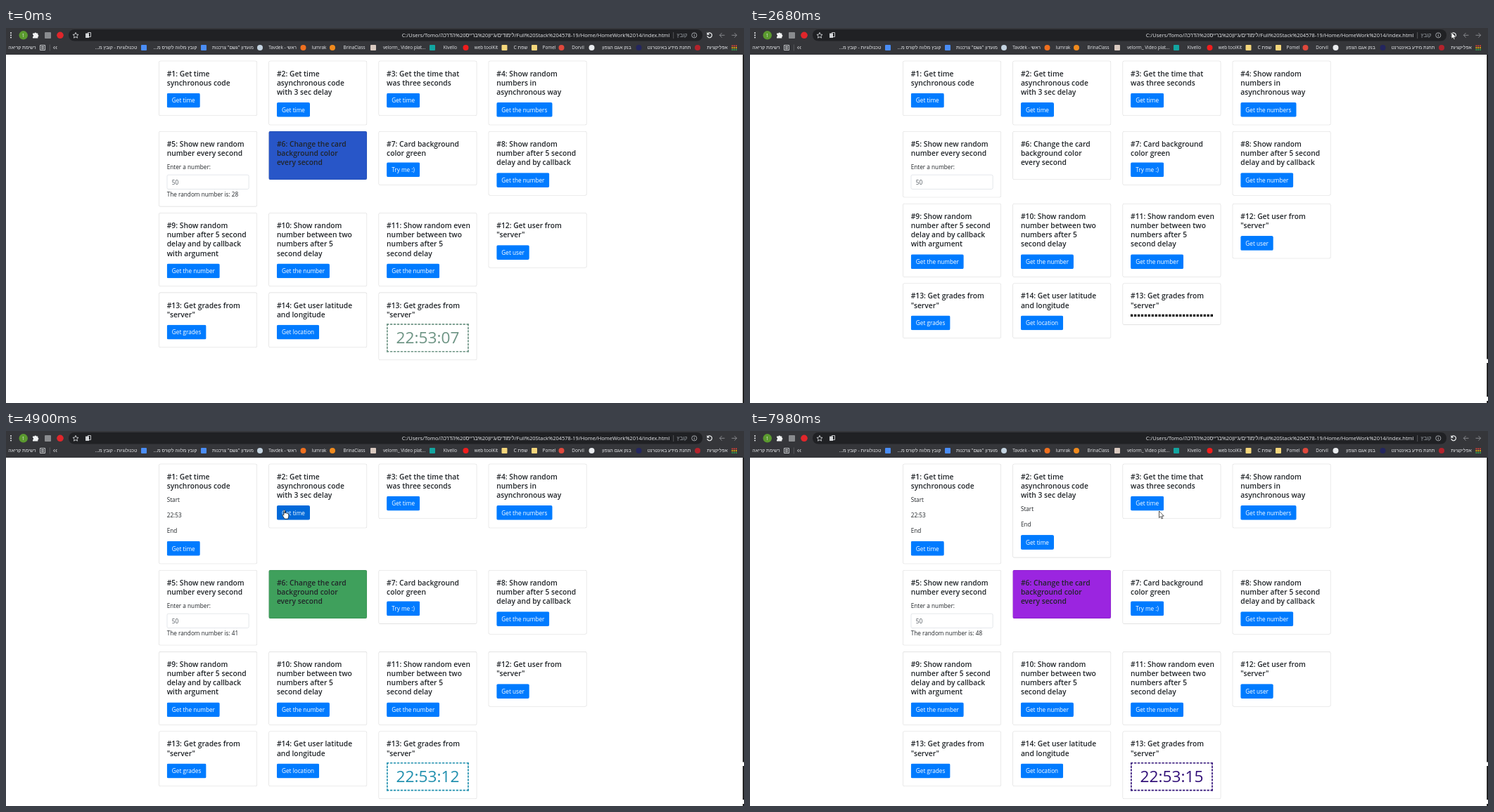
Recreate the animation shown at these times as an HTML page. Size 1049 by 534 pixels, loop 8 s.

```html
<!DOCTYPE html>
<html lang="en">
<head>
<meta charset="utf-8">
<title>Async exercises</title>
<style>
  html, body { margin: 0; width: 100%; height: 100%; overflow: hidden; background: #fff; }
  body { font: 15px/24px "Open Sans", "Noto Sans", "Liberation Sans", sans-serif; color: #212529; }
  svg { position: absolute; left: 0; top: 0; width: 1049px; height: 534px; }
  #chrome text { text-anchor: middle; fill: #e8eaed; font-size: 6.4px; line-height: 1; }
  #chrome text[direction=rtl] { font-size: 6.8px; }
  #page {
    position: absolute; left: 0; top: 0; display: grid;
    grid-template-columns: repeat(4, 255px); gap: 16px 30px; align-items: start;
    transform-origin: 0 0; transform: translate(217.2px, 46.7px) scale(.548);
  }
  .card { box-sizing: border-box; padding: 20px; border: 1px solid rgba(0, 0, 0, .15); border-radius: 4px; background: #fff; white-space: nowrap; }
  h5 { margin: 0 0 12px; font-size: 18.8px; line-height: 24px; font-weight: 600; }
  p { margin: 0 0 16px; }
  .btn { width: fit-content; padding: 6px 12px; border: 1px solid transparent; border-radius: 4px; line-height: 24px; background: #007bff; background-clip: border-box; background-origin: border-box; color: #fff; }
  /* collapses with the heading margin */
  h5 + .btn, [hidden] + .btn { margin-top: 15px; }
  h5 + .btn.tight { margin-top: 0; }
  .btn.hover { background: #0069d9; }
  .btn.down { background: #0062cc; }
  .field { margin-top: 8px; padding: 6px 12px; border: 1px solid #ced4da; border-radius: 4px; color: #495057; }
  #clock { border: 3px dashed; text-align: center; font-size: 41.4px; line-height: 67.5px; }
</style>
</head>
<body>
<div id="page"></div>
<svg id="chrome" viewBox="0 0 1049 534"></svg>
<svg id="pointer" viewBox="0 0 1049 534">
  <g id="cursor">
    <circle id="glow" r="7" fill="#e6d21e" fill-opacity=".75"/>
    <path id="arrow" d="M0 0V9.6L2.2 7.6 3.7 11 5.2 10.3 3.8 7.1H6.8Z" fill="#fff" stroke="#111" stroke-width=".7"/>
    <path id="hand" d="M-.9 1Q0-.6 .9 1V4.6Q2-.1 0 4.8 2.4 4 2.6 5 4.2 4.6 4.4 5.6 6 5.2 6 7V9.4L5 13H.2L-2.6 8.4Q-3.2 6.8-1.9 7L-.9 8Z" fill="#fff" stroke="#111" stroke-width=".7"/>
  </g>
</svg>
<script>
const LOOP = 8000, RELOAD = 2660, OPEN_1 = 3890, OPEN_2 = 5760;
const $ = id => document.getElementById(id);

// ---- page cards ----
const btn = (label, attrs = '') => `<div class="btn" ${attrs}>${label}</div>`;
const log = (id, ...lines) => `<div id="${id}" hidden>${lines.map(l => `<p>${l}</p>`).join('')}</div>`;
const number = btn('Get the number');
const cards = [
  ['#1: Get time|synchronous code', log('log1', 'Start', '22:53', 'End') + btn('Get time', 'id="btn1"')],
  ['#2: Get time|asynchronous code|with 3 sec delay', log('log2', 'Start', 'End') + btn('Get time', 'id="btn2"')],
  ['#3: Get the time that|was three seconds', btn('Get time')],
  ['#4: Show random|numbers in|asynchronous way', btn('Get the numbers')],
  ['#5: Show new random|number every second', '<div>Enter a number:</div><div class="field">50</div><div id="random"></div>'],
  ['#6: Change the card|background color|every second', ''],
  ['#7: Card background|color green', '<div class="btn tight">Try me :)</div>'],
  ['#8: Show random|number after 5 second|delay and by callback', number],
  ['#9: Show random|number after 5 second|delay and by callback|with argument', number],
  ['#10: Show random|number between two|numbers after 5|second delay', number],
  ['#11: Show random even|number between two|numbers after 5|second delay', number],
  ['#12: Get user from|"server"', btn('Get user')],
  ['#13: Get grades from|"server"', btn('Get grades')],
  ['#14: Get user latitude|and longitude', btn('Get location')],
  ['#13: Get grades from|"server"', '<div id="clock"></div>'],
];
$('page').innerHTML = cards.map(([title, body]) =>
  `<div class="card"><h5>${title.replaceAll('|', '<br>')}</h5>${body}</div>`).join('');
const tinted = $('page').children[5];

// ---- browser frame ----
function add(tag, attrs, text) {
  const el = document.createElementNS('http://www.w3.org/2000/svg', tag);
  for (const k in attrs) el.setAttribute(k, attrs[k]);
  if (text) el.textContent = text;
  return $('chrome').appendChild(el);
}
const rect = (x, y, width, height, fill, rx = 0) => add('rect', { x, y, width, height, fill, rx });
const dot = (cx, cy, r, fill) => add('circle', { cx, cy, r, fill });
const line = (d, stroke = '#e8eaed', width = 1) => add('path', { d, stroke, fill: 'none', 'stroke-width': width });
const label = (x, y, text, style = '') =>
  add('text', { x, y, style, direction: /^[^a-z]*[\u05d0-\u05ea]/i.test(text) ? 'rtl' : 'ltr' }, text);

rect(0, 0, 1049, 38, '#35363a');
rect(89, 2, 901, 16.5, '#202124', 8);
for (const y of [7, 10.3, 13.6]) dot(7, y, 1, '#e8eaed');
dot(24.7, 10.3, 6.2, '#5b9a2f');
label(24.7, 12.6, '1');
add('path', { d: 'M38 7.5H40.3A1.6 1.6 0 0 1 43.3 7.5H45.3V9.5A1.6 1.6 0 0 1 45.3 12.5V14.5H38V12.5A1.6 1.6 0 0 0 38 9.5Z', fill: '#f1f3f4' });
rect(55, 6, 9, 9, '#8a8c8f', 1);
dot(77, 10.3, 4.8, '#e0262b');
line('M99 6.4L100.2 9.1 103 9.4 100.9 11.3 101.5 14.2 99 12.7 96.5 14.2 97.1 11.3 95 9.4 97.8 9.1Z', '#e8eaed', .8);
rect(113, 7.5, 5, 6.5, '#cfd1d4', .6);
line('M116.5 6.5H120.5V12.5H116.5Z', '#e8eaed', .8);

label(943.5, 13, "C:/Users/Tomo/לימודים/ג'יון%20ברייס%20הדרכה/Full%20Stack%204578-19/Home/HomeWork%2014/index.html",
  'font-size:7.5px;text-anchor:end');
line('M948.7 6V15', '#6a6c70', .7);
label(961, 13, 'קובץ', 'font-size:7.6px;fill:#9aa0a6');
add('circle', { cx: 978.3, cy: 10.3, r: 3.6, fill: 'none', stroke: '#bdc1c6', 'stroke-width': .8 });
line('M978.3 9.8V12.3M978.3 8.1V9', '#bdc1c6', .9);
line('M997.4 8.1A3.4 3.4 0 1 1 996.7 11.2', '#f1f3f4', 1.2);
add('path', { d: 'M996.4 6V9.7H1000.1Z', fill: '#f1f3f4' });
line('M1021.5 10.3H1014.3M1017.6 7L1014.3 10.3 1017.6 13.6', '#85878b');
line('M1031.5 10.3H1038.7M1035.4 7L1038.7 10.3 1035.4 13.6', '#85878b');

// text centre, text, icon x, icon colour, round icon
const bookmarks = [
  [156.5, 'טכנולוגיות - קובץ מ...', 196, '#4a8df6'],
  [240.5, 'קובץ מלווה לקורס מ...', 281, '#4a8df6'],
  [322.5, 'מועדון "גשם" צרכנות', 361, '#c3d3e0', 1],
  [393, 'Tavdek - ראשי', 422.5, '#f0701f', 1],
  [445, 'lumrak', 464, '#f08a1d', 1],
  [495, 'BrinaClass', 522, '#d9c9c0'],
  [566, 'velorm_ Video plat...', 606, '#12a5a0'],
  [631.5, 'Kivello', 653.5, '#f01d1d', 1],
  [682.5, 'web toolKit', 708.5, '#f5d67b'],
  [731.5, 'שפת C', 751, '#f5d67b'],
  [772, 'Pomel', 789.5, '#e0483c', 1],
  [813, 'Dorvil', 832.5, '#e9ebee', 1],
  [868, 'בנק אגם הצפון', 899.5, '#24265f', 1],
  [942.5, 'תחנת מידע באינטרנט', 983, '#b3232c', 1],
];
for (const [x, text, ix, color, round] of bookmarks) {
  label(x, 30.3, text);
  round ? dot(ix, 28, 4, color) : rect(ix - 4, 24, 8, 8, color, 1);
}
label(23, 30.3, 'רשימת קריאה');
line('M48.5 24.5H55.5V31.5H48.5ZM50 26.5H54M50 28H54M50 29.7H54', '#e8eaed', .8);
line('M62.3 23.5V32.5', '#66686c', .7);
line('M69.3 26L67.6 28 69.3 30M72.3 26L70.6 28 72.3 30', '#e8eaed', .9);
label(1011, 30.3, 'אפליקציות');
const hues = ['#ea4335', '#fbbc05', '#34a853'];
for (let i = 0; i < 9; i++) rect(1031.5 + i % 3 * 2.8, 24.5 + (i / 3 | 0) * 2.8, 1.8, 1.8, hues[(i / 3 | 0)]);

rect(1047.3, 38, 1.7, 496, '#0c0c0c');
const gaps = [rect(1047, 471.5, 2, 5.5, '#fff'), rect(1047, 525, 2, 6, '#fff')];

// ---- timeline ----
// time, random number, seconds, card colour, clock colour
const ticks = [
  [0, 28, '07', '#2856c8', '#6d9484'],
  [750, 35, '08', '#36d8b7', '#5122d8'],
  [1750, 24, '09', '#4fcbff', '#f95f22'],
  [RELOAD, 0, '', '#fff', '#000'],
  [3660, 13, '11', '#96132e', '#d81452'],
  [4660, 41, '12', '#3fa05c', '#1f8fae'],
  [5660, 36, '13', '#68703a', '#bfc8c2'],
  [6660, 19, '14', '#d98f2c', '#7a4a1d'],
  [7660, 48, '15', '#9b25e0', '#310f78'],
];
const path = [
  [70, 976, 476], [310, 997, 78], [480, 1003, 40], [900, 1040, 522], [1270, 1026, 454],
  [1450, 1018, 219], [1900, 1017, 60], [2200, 997, 6], [3040, 997, 6], [3300, 690, 40],
  [3570, 274.5, 105], [3830, 274.5, 105], [3890, 265, 104], [4200, 265, 104],
  [4980, 410.5, 113], [6360, 410.5, 113], [6680, 499, 138], [7010, 499, 138],
  [7140, 553, 140], [7290, 553, 140], [7370, 556, 141], [7600, 556, 141], [7980, 581.5, 114],
];
const within = (t, ...spans) => spans.some(([a, b]) => t >= a && t < b);
const show = (el, on) => { el.style.display = on ? '' : 'none'; };

function cursorAt(t) {
  const i = path.findIndex(p => p[0] > t);
  if (i < 1) return path[i < 0 ? path.length - 1 : 0].slice(1);
  const [a, b] = [path[i - 1], path[i]], k = (t - a[0]) / (b[0] - a[0]);
  return [a[1] + (b[1] - a[1]) * k, a[2] + (b[2] - a[2]) * k];
}

let shown;
function tick(t) {
  const now = ticks.findLast(s => s[0] <= t);
  if (now === shown) return;
  shown = now;
  const [, value, sec, fill, ink] = now;
  $('random').textContent = value ? 'The random number is: ' + value : '';
  $('clock').textContent = sec && '22:53:' + sec;
  $('clock').style.color = ink;
  tinted.style.background = fill;
}

function render(t) {
  tick(t);
  $('log1').hidden = t < OPEN_1;
  $('log2').hidden = t < OPEN_2;
  $('btn1').classList.toggle('hover', within(t, [3640, 3770]));
  $('btn1').classList.toggle('down', within(t, [3770, 4050]));
  $('btn2').classList.toggle('hover', within(t, [4900, 5680]));
  $('btn2').classList.toggle('down', within(t, [5680, 5840]));
  gaps.forEach(g => show(g, t >= 800));

  const hand = within(t, [3560, OPEN_1], [4900, 6050]);
  show($('cursor'), t >= 70);
  show($('hand'), hand);
  show($('arrow'), !hand);
  show($('glow'), within(t, [2360, 2600], [3770, OPEN_1], [5680, 5840]));
  $('cursor').setAttribute('transform', `translate(${cursorAt(t)})`);
}

const start = performance.now();
(function loop() {
  render((performance.now() - start) % LOOP);
  requestAnimationFrame(loop);
})();
</script>
</body>
</html>
```
